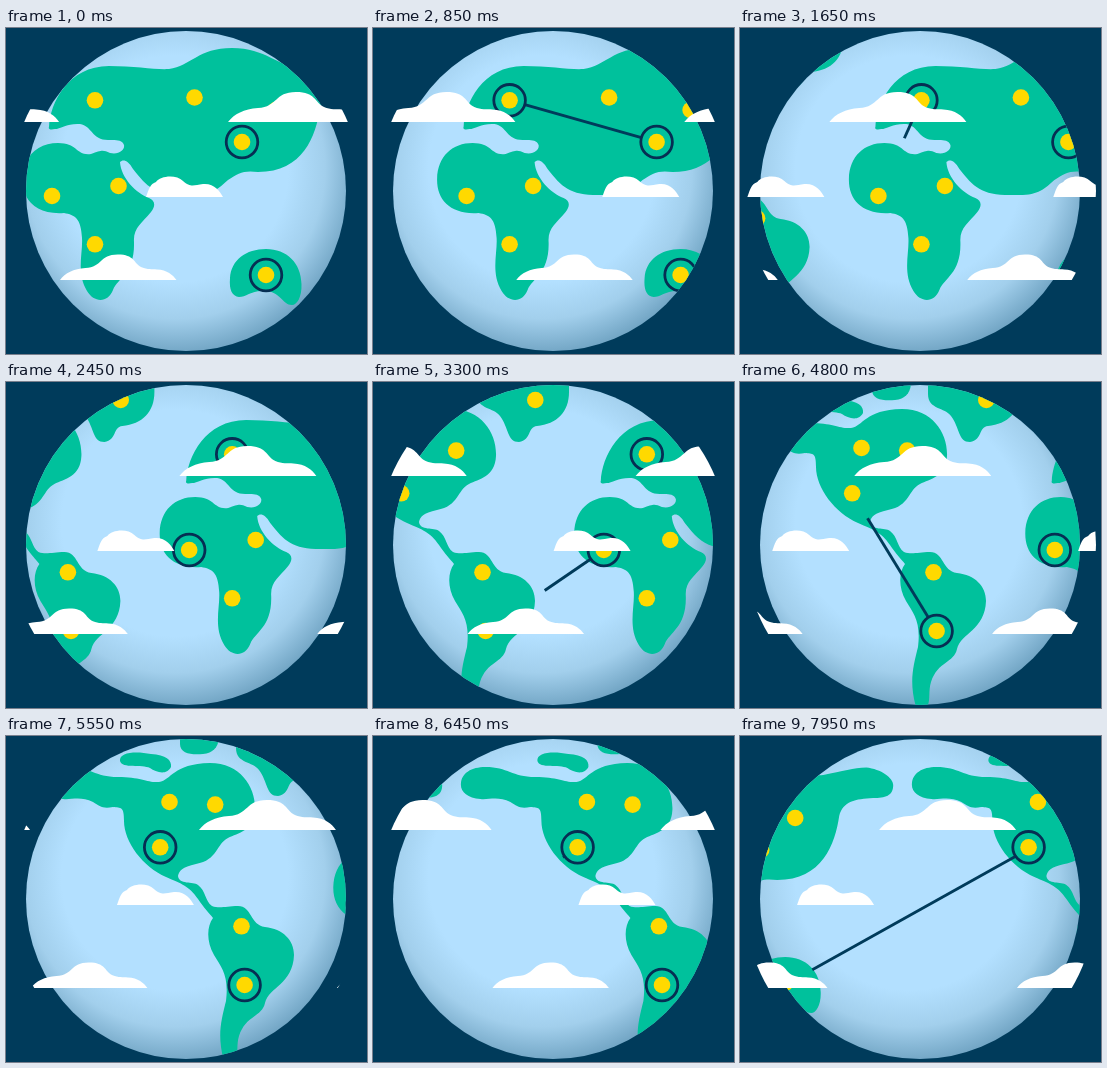
These frames come from a looping animation (361x326 px, 8000 ms). An HTML page:

```html
<!DOCTYPE html>
<html lang="en">
<head>
<meta charset="utf-8">
<title>Spinning globe</title>
<style>
html, body { margin: 0; width: 100%; height: 100%; overflow: hidden; background: #003b5b; }
svg { display: block; width: 100vw; height: 100vh; }
</style>
</head>
<body>
<svg viewBox="0 0 361 326">
  <defs>
    <radialGradient id="sea" gradientUnits="userSpaceOnUse" cx="169" cy="141" r="183">
      <stop offset=".62" stop-color="#b3e0ff"/>
      <stop offset=".82" stop-color="#a2cfec"/>
      <stop offset="1" stop-color="#74a7c6"/>
    </radialGradient>
    <clipPath id="globe"><circle cx="180" cy="163" r="160"/></clipPath>
    <clipPath id="sky"><circle cx="180" cy="163" r="176"/></clipPath>

    <g id="oldWorld">
      <path d="M43 99C44 75 62 38 103 38C130 38 150 42 163 41C185 38 192 20 226 20C262 20 275 42 298 39
        C318 35 328 32 341 31.5C356 33 368 42 368 49C368 60 360 62 348 62C330 63 318 65 314 80
        C310 108 297 144 252 144C238 142 232 145 222 152C212 161 205 168 183 167C150 168 142 160 127 141
        C122 132 117 131 114 134C115 150 130 165 143 170C149 173 150 177 145 184C136 195 127 200 128 214
        C129 245 112 250 107 262C102 275 88 275 81 263C70 245 77 225 76 210C75 190 69 187 58 185
        C30 187 16 172 16.5 151C17 128 32 115 52 115C72 115 70 128 85 126C96 122 97 122 104 125
        C113 127 119 122 118 117C116 111 108 112 102 112C86 112 86 98 74 96C62 95 54 101 49 101
        C44 102 42 101 43 99Z"/>
      <path d="M224 250C225 232 240 221 260 221C281 221 295 235 295.5 256C296 269 291 277 286 277
        C276 277 275 263 258 263C246 262 240 269 233 269C226 268 223 262 224 250Z"/>
    </g>
    <g id="newWorld">
      <path d="M37.5 48C38 37 48 31 62 31C85 31 88 41 112 41C135 41 142 47 153 46C166 44 166 28 204 27
        C235 27 250 52 249 74C248 95 232 97 222 102C210 108 212 124 190 128C176 131 173 135 172 140
        C173 149 187 145 192 149C200 155 199 165 206 170C214 173 220 170 232 170
        C246 170 244 189 259 191C277 193 288 204 288 219C287 248 263 251 259 267C256 281 240 279 233 300
        C230 310 233 318 229 325L218 325C211 300 215 285 220 265C223 240 216 232 208 219
        C200 205 201 190 207 182C203 177 198 172 192 163C183 150 176 148 160 141C137 131 118 106 118 85
        C118 70 115 72 107 71C96 73 94 70 87 66C75 60 65 64 57 63C44 62 37 56 37.5 48Z"/>
      <path d="M114 25C113 16 130 15 145 18C160 19 166 24 165 31C160 40 150 36 144 32C136 28 116 33 114 25Z"/>
      <path d="M174 0V8C174 18 186 19 197 18C208 17 213 10 213 0Z"/>
      <path d="M230 0V12C230 28 247 25 253 34C262 46 260 60 272 60C285 58 280 45 290 44C310 42 322 30 322 10V0Z"/>
    </g>
    <path id="bigCloud" d="M0 0C6 -8 16 -13 30 -14C50 -15 46 -30 68 -30C88 -30 86 -20 96 -15
      C103 -12 108 -13 114 -12.5C126 -12 133 -6 137 0Z"/>
    <path id="smallCloud" d="M0 0C3 -8 4 -13 10 -15C14 -21 30 -23 37 -16C45 -9 48 -12 57 -13C68 -14 74 -6 77 0Z"/>
  </defs>

  <rect width="361" height="326" fill="#003b5b"/>
  <circle cx="180" cy="163" r="160" fill="url(#sea)"/>
  <g clip-path="url(#globe)">
    <g id="map">
      <g fill="#00c19c">
        <use href="#oldWorld"/>
        <use href="#oldWorld" x="-660"/>
        <use href="#newWorld" x="-310.8"/>
      </g>
      <g id="lines" stroke="#003b5b" stroke-width="2.9"></g>
      <g id="rings" fill="none" stroke="#062e53" stroke-width="2.8"></g>
      <g id="dots" fill="#ffd900"></g>
    </g>
  </g>
  <g id="clouds" clip-path="url(#sky)" fill="#fff"></g>
</svg>
<script>
const LOOP = 8000, STEP = 50;
const MAP_SPEED = 56, MAP_WIDTH = 660;
const CLOUD_SPEED = 105, CLOUD_GAP = 305.9;
const RING = 15.8;

const $ = id => document.getElementById(id);
function set(el, attrs) {
  for (const k in attrs) el.setAttribute(k, attrs[k]);
}
function add(parent, tag, attrs) {
  const el = document.createElementNS('http://www.w3.org/2000/svg', tag);
  set(el, attrs);
  return $(parent).appendChild(el);
}
const ramp = (t, a, b) => Math.min(1, Math.max(0, (t - a) / (b - a)));
const easeOut = u => 1 - (1 - u) * (1 - u);
const easeInOut = u => u * u * (3 - 2 * u);

const australia = [260, 247], asia = [236, 114], europe = [89, 72.3], africa = [46, 168];
const southAm = [-72.2, 249], northAm = [-156.6, 111.3];

const oldDots = [australia, asia, europe, africa, [188.5, 69.5], [270, 82], [112.5, 158], [89, 216.3]];
const newDots = [southAm, northAm, [-147.3, 66], [-101.6, 68.6], [-75.3, 190.3], [-22.5, 18]];
for (const [cx, cy] of [...oldDots, ...oldDots.map(([x, y]) => [x - MAP_WIDTH, y]), ...newDots])
  add('dots', 'circle', { cx, cy, r: 8.3 });

for (const [cx, cy] of [australia, asia]) add('rings', 'circle', { cx, cy, r: RING });

// Head leaves and lands, tail leaves and lands (seconds).
const lines = [
  [asia, europe, .05, .5, 1, 1.4],
  [europe, africa, 1.45, 1.95, 1.95, 2.35],
  [africa, southAm, 3, 3.6, 3.6, 4],
  [southAm, northAm, 4.4, 4.9, 5, 5.4],
  [[-156.6, 113], [-400, 249], 6.38, 8.23, 9, 10]
].map(([from, to, ...times]) => ({ from, to, times, el: add('lines', 'line', {}) }));

const rings = [[europe, .3], [africa, 1.9], [southAm, 3.95], [northAm, 4.85]]
  .map(([[cx, cy], pop]) => ({
    pop,
    echo: add('rings', 'circle', { cx, cy, 'stroke-width': 4 }),
    ring: add('rings', 'circle', { cx, cy })
  }));

const clouds = [['bigCloud', 222, 94, 1], ['smallCloud', 140, 169, 1], ['bigCloud', 54, 252, .85]]
  .flatMap(([shape, x, y, scale]) => [-1, 0, 1].map(copy =>
    ({ x, y, scale, copy, el: add('clouds', 'use', { href: '#' + shape }) })));

function drawLine({ from, to, times, el }, t) {
  const [out, land, leave, done] = times;
  const head = easeInOut(ramp(t, out, land)), tail = easeInOut(ramp(t, leave, done));
  const dx = to[0] - from[0], dy = to[1] - from[1], len = Math.hypot(dx, dy);
  const at = u => {
    const k = (RING + u * (len - 2 * RING)) / len;
    return [from[0] + dx * k, from[1] + dy * k];
  };
  const [x1, y1] = at(tail), [x2, y2] = at(head);
  set(el, { x1, y1, x2, y2, visibility: head > tail ? 'visible' : 'hidden' });
}

function drawRing({ pop, echo, ring }, t) {
  const visibility = t >= pop ? 'visible' : 'hidden';
  const spread = ramp(t, pop, pop + .5);
  set(ring, { r: 8 + (RING - 8) * easeOut(ramp(t, pop, pop + .4)), visibility });
  set(echo, { r: RING + 18 * easeOut(spread), opacity: .65 * (1 - spread), visibility });
}

function draw(ms) {
  const t = Math.floor(ms % LOOP / STEP) * STEP / 1000;
  set($('map'), { transform: `translate(${MAP_SPEED * t})` });
  for (const line of lines) drawLine(line, t);
  for (const ring of rings) drawRing(ring, t);
  for (const { x, y, scale, copy, el } of clouds) {
    const left = (x + CLOUD_SPEED * t) % CLOUD_GAP + copy * CLOUD_GAP;
    set(el, { transform: `translate(${left} ${y}) scale(${scale})` });
  }
}

const start = performance.now();
function tick() {
  draw(performance.now() - start);
  requestAnimationFrame(tick);
}
tick();
</script>
</body>
</html>
```
